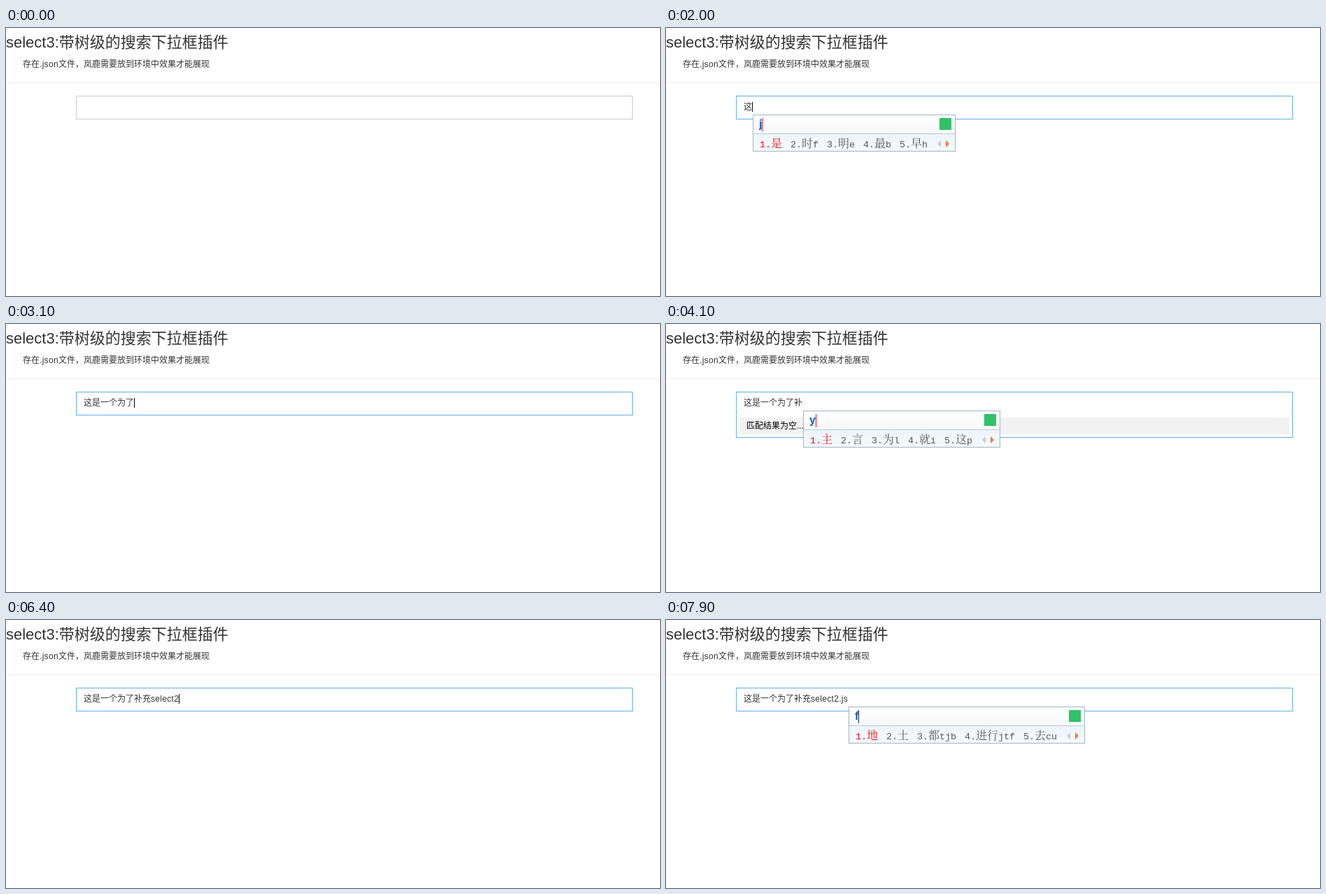
These frames come from a looping animation (935 by 384 pixels, 8 s). An HTML page:

```html
<!DOCTYPE html>
<html lang="zh-CN">
<head>
<meta charset="utf-8">
<title>select3</title>
<style>
html, body { margin: 0; width: 100%; height: 100%; overflow: hidden; background: #fff; }
body { position: relative; color: #333; font: 12px/24px 'Liberation Sans', 'Noto Sans CJK SC', 'Noto Sans CJK', sans-serif; white-space: pre; }
div, b, u, s { position: absolute; box-sizing: border-box; }
i { font-style: normal; letter-spacing: .3px; }
h1 { position: absolute; margin: 0; left: 0; top: 9px; font-size: 22px; font-weight: 400; line-height: 24px; }
#rule { left: 0; top: 78px; width: 100%; height: 1px; background: #eee; }
#box { left: 100px; top: 97px; width: 796px; height: 34px; border: 1px solid #ccc; }
#box.focus { border-color: #62b0e0; }
#box.open { border-bottom-color: transparent; }
#field { left: 111px; top: 101px; }
#caret { display: inline-block; width: 1px; height: 14px; background: #000; vertical-align: -3px; }
#hint { color: #999; margin-left: -1px; }
#list, #empty { left: 100px; width: 796px; border: 1px solid #62b0e0; border-top: 0; color: #000; overflow: hidden; }
#list { top: 130px; height: 201px; background: #fff; }
#empty { top: 131px; height: 32px; }
#empty div { left: 4px; top: 3px; width: 786px; height: 24px; padding-left: 10px; background: #f2f2f2; }
.row { left: 0; width: 777px; height: 31px; border-top: 1px solid #ccc; }
.row b { top: 4px; font-weight: 400; }
.row u { top: 4px; width: 1px; height: 24px; background: #ccc; }
s { border: 4px solid transparent; }
.down { border-top: 5px solid; border-bottom: 0; }
.up { border-bottom: 4px solid; border-top: 0; }
.right { border-left: 5px solid; border-right: 0; }
.left { border-right: 5px solid; border-left: 0; }
#bar { left: 777px; top: 0; width: 17px; height: 200px; background: #f0f0f0; color: #444; }
#thumb { left: 1px; top: 19px; width: 15px; height: 86px; border: 1px solid #979797; border-radius: 2px; background: linear-gradient(90deg, #f5f5f5, #e6e6e6 48%, #cfcfcf 52%, #c4c4c4); }
#thumb u { left: 3px; top: 37px; width: 7px; height: 9px; background: repeating-linear-gradient(#555 0 1px, #eee 1px 3px); }
#ime { top: 124px; height: 53px; padding: 27px 39px 0 9px; border: 1px solid #9fb4c4; background: linear-gradient(#fff, #f7f8f9) 0 0 / 100% 26px no-repeat, linear-gradient(#e2eef8, #f5fafe); }
#ime::before { content: ''; position: absolute; left: 0; top: 26px; width: 100%; height: 1px; background: #b5cfe2; }
#code { left: 8px; top: 1px; font: bold 16px/24px 'Liberation Sans', sans-serif; color: #125fb2; }
#bar2 { right: -1px; top: 3px; width: 1px; height: 19px; }
#mark { right: 5px; top: 4px; width: 17px; height: 17px; background: #2fc266; }
#words { font: 300 16px/26px 'Noto Serif CJK SC', 'Noto Sans CJK SC', 'Noto Sans CJK', serif; color: #555; }
#words i { font: 13.33px 'Liberation Mono', monospace; letter-spacing: 0; }
#words span { margin-right: 12px; }
#words span:first-child { color: #f01010; }
#words span:last-child { margin: 0; }
#ime s { top: 36px; border-top-width: 5px; border-bottom-width: 5px; }
</style>
</head>
<body>
<h1>select3:带树级的搜索下拉框插件</h1>
<div style="left:24px;top:40px">存在<i>.json</i>文件，岚鹿需要放到环境中效果才能展现</div>
<div id="rule"></div>
<div id="list"><div id="bar"><s class="up" style="left:6px;top:7px"></s><div id="thumb"><u></u></div><s class="down" style="left:6px;top:190px;border-top-width:4px"></s></div></div>
<div id="empty"><div>匹配结果为空...</div></div>
<div id="box"></div>
<div id="field"><span id="text"></span><span id="caret"></span><i id="hint">Please select a</i></div>
<div id="ime"><div id="code"><span id="keys"></span><u id="bar2"></u></div><div id="mark"></div><span id="words"></span><s class="left" style="right:20px;color:#c9ccd0"></s><s class="right" style="right:8px;color:#f5793a"></s></div>
<script>
const $ = id => document.getElementById(id);
const wrapLatin = s => s.replace(/[!-~]+/g, '<i>$&</i>');
const show = (id, on) => { $(id).style.display = on ? '' : 'none'; };

// label, depth, arrow
[['节点1', 0, 'down'], ['节点11', 1, 'down'], ['节点111', 2], ['节点112', 2],
 ['节点12', 1], ['节点2', 0, 'right'], ['节点3', 0, 'down']].forEach(([label, depth, arrow], n) => {
  const x = depth * 26;
  const mark = !arrow ? '' : `<u style="left:${25 + x}px"></u>` +
    `<s class="${arrow}" style="left:${(arrow == 'down' ? 8 : 10) + x / 2}px;top:${arrow == 'down' ? 13 : 11}px"></s>`;
  $('list').insertAdjacentHTML('beforeend',
    `<div class="row" style="top:${n * 31}px">${mark}<b style="left:${30 + x}px">${label}</b></div>`);
});

const candidates = {
  p: '这 之 宽w 害d 字b',
  j: '是 时f 明e 最b 早h',
  g: '一 王 五g 理j 现m',
  wh: '个 企业og 个人ww 修改nt 个性nt',
  o: '为 米 业g 类d 炎o',
  b: '了 子 出m 也n 取c',
  pu: '补h 袢f 初v 裕w 社f',
  y: '主 言 为l 就i 这p',
  f: '地 土 都tjb 进行jtf 去cu'
};

const full = '这是一个为了补充select2.js';
// start, characters typed, panel opacity, caret, composing keys
const steps = [
  [0, 0, 0, 0], [800, 0, .3, 1], [900, 0, .7, 1], [1000, 0, 1, 1], [1300, 0, 1, 0],
  [1700, 0, 1, 1, 'p'], [1800, 1, 0, 1], [2000, 1, 0, 1, 'j'], [2100, 2, 0, 1],
  [2200, 2, 0, 1, 'g'], [2300, 3, 0, 1], [2400, 3, .5, 1, 'wh'], [2500, 3, 1, 1, 'wh'],
  [2600, 4, 0, 1], [2700, 4, .5, 1, 'o'], [2800, 5, 0, 1], [2900, 5, 0, 1, 'b'],
  [3000, 6, 1, 1], [3100, 6, 0, 1], [3200, 6, .5, 1, 'p'], [3300, 6, 1, 1, 'pu'],
  [3400, 7, 0, 1], [3500, 7, .5, 1], [3600, 7, 1, 1], [4000, 7, 1, 0], [4100, 7, 1, 0, 'y'],
  [4300, 8, 0, 1], [4400, 8, 1, 1], [4800, 8, 1, 0], [5100, 9, 1, 1], [5200, 10, 1, 1],
  [5300, 11, 1, 1], [5400, 11, 0, 1], [5500, 12, .5, 1], [5600, 13, 1, 1], [5700, 14, 0, 1],
  [5800, 14, 1, 1], [6000, 15, 1, 1], [6400, 15, 0, 1], [6500, 15, 1, 1], [7000, 16, 1, 1],
  [7100, 16, 0, 1], [7200, 17, .5, 1], [7300, 18, 0, 1], [7400, 18, 1, 1], [7700, 18, 0, 1],
  [7900, 18, 0, 0, 'f']
];

function draw([start, count, panel, caret, keys]) {
  const focus = start >= 800, searching = start >= 1800;
  $('box').className = (focus ? 'focus' : '') + (searching && panel == 1 ? ' open' : '');
  $('text').innerHTML = wrapLatin(full.slice(0, count));
  $('caret').style.visibility = caret ? '' : 'hidden';
  show('hint', focus && !count && !keys);

  show('list', !searching && panel);
  $('list').style.opacity = panel;
  show('empty', searching && panel);
  const whole = panel == 1;
  $('empty').style.borderColor = whole ? '' : 'transparent';
  $('empty').firstChild.style.cssText = whole ? '' : 'background:#f8f8f8;color:transparent';

  show('ime', keys);
  if (!keys) return;
  $('ime').style.left = Math.round($('caret').getBoundingClientRect().left) + 1 + 'px';
  $('keys').textContent = keys;
  $('bar2').style.background = keys == 'f' ? '#222' : '#f01010';
  $('words').innerHTML = candidates[keys].split(' ')
    .map((word, n) => `<span>${wrapLatin(n + 1 + '.' + word)}</span>`).join('');
}

let last;
function tick() {
  const t = performance.now() % 8000;
  const step = steps.findLast(s => s[0] <= t);
  if (step != last) draw(last = step);
  requestAnimationFrame(tick);
}
tick();
</script>
</body>
</html>
```
